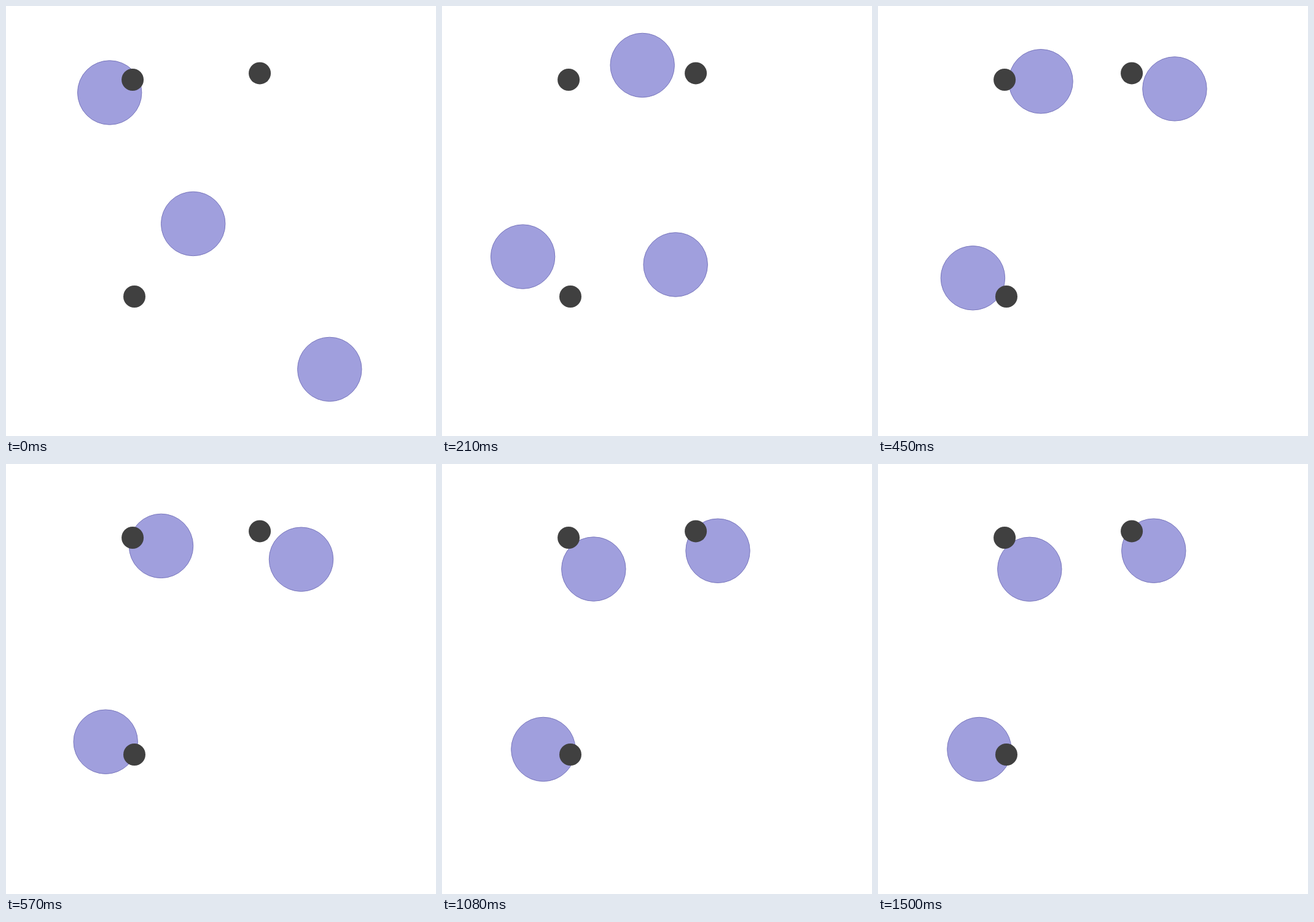
An HTML page for the animation above (1.53 s loop, 700 by 700 pixels).

```html
<!DOCTYPE html>
<html lang="en">
<head>
<meta charset="utf-8">
<title>Settling circles</title>
<style>
  html, body { margin: 0; width: 100%; height: 100%; overflow: hidden; background: #fff; }
  svg { display: block; width: 100vw; height: 100vh; }
  .ball { fill: #a09fdd; stroke: #7a78bd; stroke-width: 1; }
  .pin { fill: #404040; }
</style>
</head>
<body>
<svg id="stage" viewBox="0 0 700 700"></svg>
<script>
const TICK = 30, TICKS = 51;
const DECAY = 0.747; // share of the remaining distance kept per tick

// Each ball swings through a few points, then eases to rest beside its pin.
const TIMES = [0, 4, 8, 11, 16, 19];
const BALLS = [
  { pin: [413.1, 109.4], rest: [448.8, 141.2],
    path: [[168.7, 141], [287.7, 123.5], [336, 89], [366.5, 78], [498, 146], [480.5, 155.2]] },
  { pin: [209, 473], rest: [164.9, 464.5],
    path: [[304.7, 354.5], [199, 385], [121, 415], [139.3, 432], [157, 445], [162.2, 452.2]] },
  { pin: [206.1, 120], rest: [246.8, 171.3],
    path: [[526.8, 591.4], [438.6, 543.2], [361, 376], [302.5, 247], [260, 111], [252.5, 133.4]] }
];

const stage = document.getElementById('stage');

function circle(name, r, [x, y] = [0, 0]) {
  const el = document.createElementNS('http://www.w3.org/2000/svg', 'circle');
  const attrs = { class: name, r, cx: x, cy: y };
  for (const key in attrs) el.setAttribute(key, attrs[key]);
  return stage.appendChild(el);
}

for (const ball of BALLS) ball.el = circle('ball', 52.2);
for (const ball of BALLS) circle('pin', 18, ball.pin);

const LAST = TIMES.length - 1;
const span = i => TIMES[i + 1] - TIMES[i];

function slope({ path, rest }, i, axis) {
  const rate = j => (path[j + 1][axis] - path[j][axis]) / span(j);
  if (i === 0) return rate(0);
  if (i === LAST) return (path[i][axis] - rest[axis]) * Math.log(DECAY);
  return (rate(i - 1) * span(i) + rate(i) * span(i - 1)) / (span(i - 1) + span(i));
}

function place(ball, t, axis) {
  const { path, rest } = ball;
  if (t >= TIMES[LAST]) {
    return rest[axis] + (path[LAST][axis] - rest[axis]) * DECAY ** (t - TIMES[LAST]);
  }
  const i = TIMES.findIndex(end => t < end) - 1;
  const h = span(i), u = (t - TIMES[i]) / h, v = 1 - u;
  return path[i][axis] * v * v * (1 + 2 * u) + path[i + 1][axis] * u * u * (1 + 2 * v)
    + h * u * v * (v * slope(ball, i, axis) - u * slope(ball, i + 1, axis));
}

function draw(ms) {
  const tick = Math.floor(ms / TICK) % TICKS;
  for (const ball of BALLS) {
    ball.el.setAttribute('cx', place(ball, tick, 0));
    ball.el.setAttribute('cy', place(ball, tick, 1));
  }
}

const start = performance.now();
function loop() {
  draw(performance.now() - start);
  requestAnimationFrame(loop);
}
loop();
</script>
</body>
</html>
```
